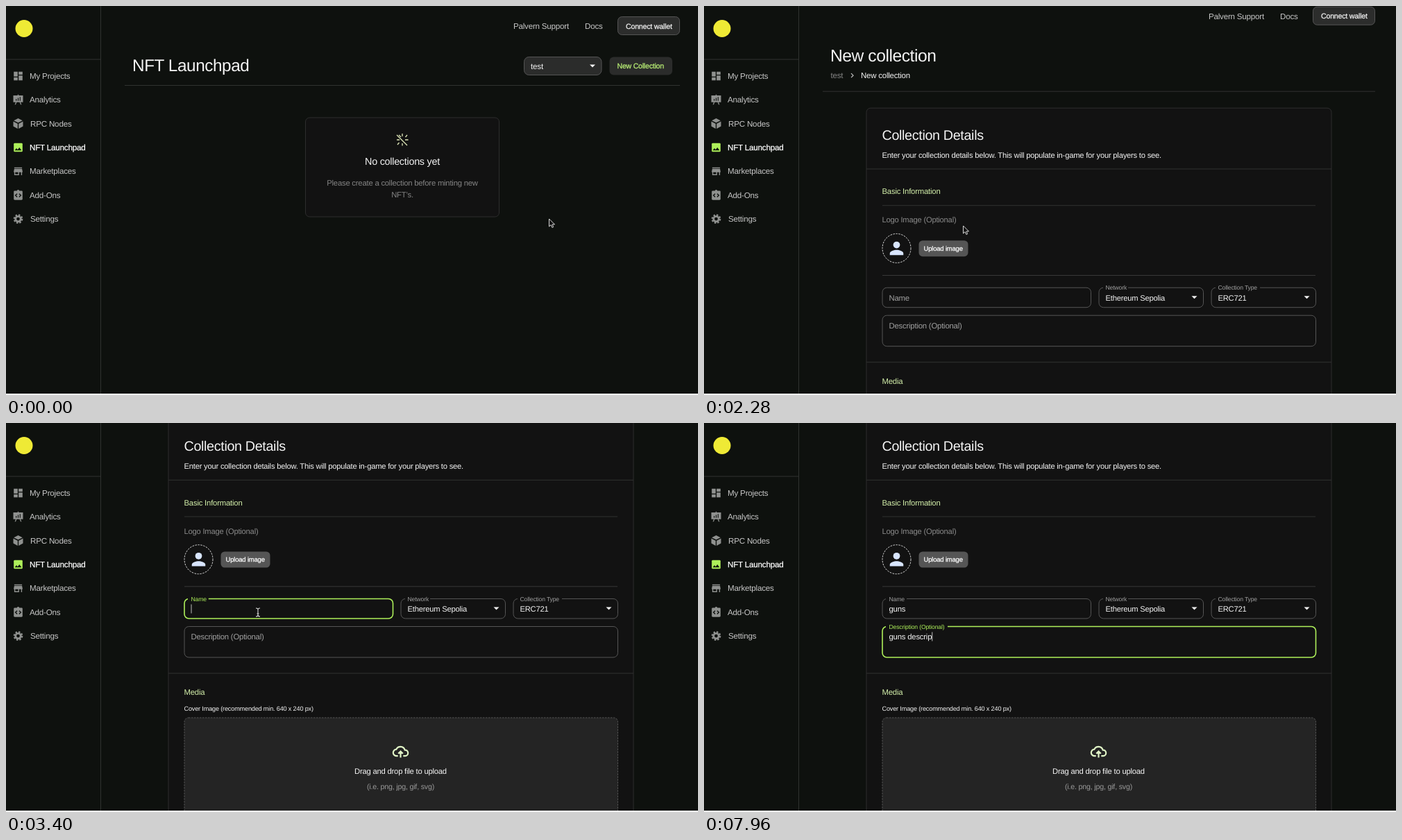
An HTML page that plays this animation: 997 by 561 pixels, repeating every 8000 ms.

```html
<!DOCTYPE html>
<html lang="en">
<head>
<meta charset="utf-8">
<title>Launchpad demo</title>
<style>
html, body { margin: 0; width: 100%; height: 100%; overflow: hidden; background: #fff }
svg { display: block; font-family: "Liberation Sans", Arial, sans-serif }
text { fill: currentColor; white-space: pre; letter-spacing: -.018em; text-rendering: geometricPrecision }
.medium { stroke: currentColor; stroke-width: .25 }
.center { text-anchor: middle }
</style>
</head>
<body>
<svg id="stage" width="997" height="561" viewBox="0 0 997 561"></svg>
<script>
const BG = '#0e110e', CARD = '#121212', LINE = '#303230', BORDER = '#555';
const WHITE = '#f4f4f4', GRAY = '#a0a0a0', SOFT = '#c6c6c6', LIME = '#aef05a', PALE = '#d3efaa';
const LOOP = 8000, STEP = 40;
const TIGHT = 1.04; // slightly larger glyphs make up for the tight letter spacing

// Drawing helpers
const text = (x, y, size, str, color = WHITE, cls = '') =>
  `<text x="${x}" y="${y}" font-size="${size * TIGHT}" color="${color}" class="${cls}">${str}</text>`;
const box = (x, y, w, h, r, fill, stroke = 'none', extra = '') =>
  `<rect x="${x}" y="${y}" width="${w}" height="${h}" rx="${r}" fill="${fill}" stroke="${stroke}" ${extra}/>`;
const path = (d, extra = '') => `<path d="${d}" ${extra}/>`;
const line = (x1, x2, y, color = LINE) => path(`M${x1} ${y}H${x2}`, `stroke="${color}"`);
const group = (id, body, extra = '') => `<g id="${id}" ${extra}>${body}</g>`;
const icon = (cx, cy, scale, body, color) =>
  `<g transform="translate(${cx} ${cy}) scale(${scale}) translate(-12 -12)" fill="${color}">${body}</g>`;
const arrowDown = (x, y) => path(`M${x - 4} ${y - 2}h8l-4 4z`, `fill="${WHITE}"`);

const icons = {
  'My Projects': path('M3 13h8V3H3zM3 21h8v-6H3zM13 21h8V11h-8zM13 3v6h8V3z'),
  'Analytics': path('M11 1h2v2h9v14h-5l2 5h-2l-2-5H9l-2 5H5l2-5H2V3h9z') +
    path('M8 14v-4M12 14V8M16 14V6', `stroke="${BG}" stroke-width="1.6"`),
  'RPC Nodes': path('M12 1l9 4.5-9 4.5-9-4.5zM2 7.5l9 4.5v10.500l-9-5zM22 7.500l-9 4.500v10.500l9-5z'),
  'NFT Launchpad': box(3, 3, 18, 18, 2, LIME) + path('M5 18l3.500-4.500 2.500 3 3.500-4.500 4.500 6z', `fill="${BG}"`),
  'Marketplaces': path('M4 4h16v2H4zM4 7h16l1 5v2h-1v6h-2v-6h-4v6H4v-6H3v-2zM6 14v4h6v-4z', 'fill-rule="evenodd"'),
  'Add-Ons': box(3, 3, 18, 19, 2, '#8f918f') + '<circle cx="12" cy="3.500" r="2.500"/>' +
    path('M10 9l-3.500 3.500 3.500 3.500M14 9l3.500 3.500-3.500 3.500', `fill="none" stroke="${BG}" stroke-width="2"`),
  'Settings': '<g fill="none" stroke="#8f918f"><circle cx="12" cy="12" r="5.400" stroke-width="4"/>' +
    '<circle cx="12" cy="12" r="8.200" stroke-width="3.200" pathLength="16" stroke-dasharray="1.100 .9"/></g>'
};

const sidebar = () =>
  path('M136.500 0V559', `stroke="${LINE}"`) + line(0, 136, 77) +
  '<circle cx="26" cy="32.500" r="12.500" fill="#efea35"/>' +
  Object.entries(icons).map(([name, art], i) => {
    const y = 101 + i * 34.350, active = name === 'NFT Launchpad';
    return icon(17.5, y, .7, art, '#8f918f') +
      text(name[0] === 'R' || name[0] === 'S' ? 35 : 34, y + 4, 11.2, name, active ? '#fff' : SOFT, active ? 'medium' : '');
  }).join('');

const topBar = right =>
  text(right - 240, 33, 11.15, 'Palvern Support', SOFT) + text(right - 137, 33, 11.15, 'Docs', SOFT) +
  box(right - 89.5, 15.5, 89, 26, 6, '#2c2d2c', BORDER) +
  text(right - 78, 32.5, 10.2, 'Connect wallet', WHITE, 'medium');

const listPage = () =>
  topBar(971) + text(182, 94, 23.4, 'NFT Launchpad') +
  box(746.5, 73.5, 111.5, 26, 7, '#2b2c2b', BORDER) + text(756, 90.5, 11.2, 'test') + arrowDown(845, 86.5) +
  box(869.5, 73.5, 90.5, 26, 6, '#2b2c2b') + text(880.5, 90.3, 10.1, 'New Collection', '#bdf477', 'medium') +
  line(171, 971, 114.5) +
  box(431.5, 161, 279, 143, 6, CARD, '#2d2d2d') +
  path('M563 186l15 15M571 184v4M575.500 189l2.500-3M575 193h4.500M571 198v3.500M566.500 197l-2.500 3M563 193h4M566 186l3 3',
    'stroke="#dfe8b8" stroke-width="1.300"') +
  text(571, 229, 13.8, 'No collections yet', WHITE, 'center') +
  text(571, 259.3, 10.85, 'Please create a collection before minting new', '#858585', 'center') +
  text(571, 276, 10.85, 'NFT’s.', '#858585', 'center');

// Outlined input with a label that floats onto its border
const field = (id, x, y, w, h, label) =>
  group(id,
    box(x, y, w, h, 6.5, 'none', BORDER, 'class="frame"') +
    box(x + 5, y - 2, 0, 4, 0, CARD, 'none', 'class="gap"') +
    text(0, 0, 10.9, label, GRAY, 'label') + text(x + 9.5, y + 18.5, 10.9, '', WHITE, 'value') +
    box(x + 9.5, y + 8, 1, 13, 0, '#bbb', 'none', 'class="caret"'));

const select = (x, label, gap, value) =>
  box(x, 253.5, 150.5, 28.5, 6.5, 'none', BORDER) + box(x + 6, 251, gap, 5, 0, CARD) +
  text(x + 9.5, 256.5, 8.3, label, GRAY) + text(x + 9.5, 272, 10.75, value) + arrowDown(x + 137.5, 267.5);

const FIELDS = {
  name: { x: 257, y: 253.5, w: 300.5, h: 28.5, gap: 30, focus: 3240, blur: 5160,
    value: 'guns', keys: [3720, 3840, 4040, 4160] },
  about: { x: 257, y: 293.5, w: 624.5, h: 44.5, gap: 89, focus: 5160, blur: Infinity,
    value: 'guns descrip', keys: [5560, 5760, 5960, 6120, 6320, 6600, 6840, 7120, 7320, 7560, 7760, 7960] }
};
const addField = (id, label) => {
  const { x, y, w, h } = FIELDS[id];
  return field(id, x, y, w, h, label);
};

// The form is laid out as it stands after scrolling
const formPage = () =>
  `<g transform="translate(0 -167)">` + topBar(967) + text(182, 94, 23.7, 'New collection') +
  text(182.5, 118.5, 11.1, 'test', '#858585') +
  path('M212 111.500l3 3-3 3', `fill="none" stroke="${SOFT}" stroke-width="1.200"`) +
  text(226, 118.5, 11, 'New collection') + line(171, 967, 137.5) + '</g>' +
  box(234, -5.5, 670, 900, 6, CARD, '#2d2d2d') +
  text(256.5, 40.3, 19, 'Collection Details') +
  text(256.5, 66.3, 10.75, 'Enter your collection details below. This will populate in-game for your players to see.') +
  line(234, 904, 82.3) + text(256.5, 118.8, 10.9, 'Basic Information', PALE) + line(257, 881, 135) +
  text(256.5, 159.5, 10.75, 'Logo Image (Optional)', '#8a8a8a') +
  `<ellipse cx="277.500" cy="196.700" rx="20.500" ry="21" fill="none" stroke="#ddd" stroke-dasharray="2.500 1.500"/>` +
  icon(277.5, 196.7, 1.22, '<circle cx="12" cy="8" r="4"/>' +
    path('M12 14c-2.700 0-8 1.300-8 4v2h16v-2c0-2.700-5.300-4-8-4z'), '#d8e5ff') +
  box(309.5, 185.5, 71, 23, 5.5, '#555') + text(316.5, 200.2, 9.1, 'Upload image', '#fff', 'medium') +
  line(257, 881, 235.8, '#383838') +
  addField('name', 'Name') + select(569, 'Network', 36, 'Ethereum Sepolia') +
  select(731, 'Collection Type', 64, 'ERC721') + addField('about', 'Description (Optional)') +
  line(234, 904, 361) + text(256.5, 392, 10.9, 'Media', PALE) +
  text(256.5, 415.3, 8.76, 'Cover Image (recommended min. 640 x 240 px)') +
  box(257, 425, 624.5, 180, 6, '#242424', '#555', 'stroke-dasharray="2.500 1.500"') +
  icon(568.5, 473.5, .95, path('M8 19H6A5 5 0 0 1 5.500 9 7 7 0 0 1 18.500 10a4.500 4.500 0 0 1 .5 9h-3M12 21.500v-9M8.500 15.500l3.500-3.500 3.500 3.500',
    `fill="none" stroke="#e0f4c6" stroke-width="2.300"`), 'none') +
  text(568.5, 505.5, 10.8, 'Drag and drop file to upload', WHITE, 'center') +
  text(568.5, 528.3, 10.25, '(i.e. png, jpg, gif, svg)', '#9a9a9a', 'center');

const pointers = {
  arrow: path('M0 0V11L2.600 8.700 4.400 12.500 6.200 11.700 4.500 8H8z', 'fill="#111" stroke="#eee" stroke-width=".9"'),
  hand: path('M0 1q1-1.500 2 0l.8 3.500 3.700.8q1.200.6.8 2l-.8 4.200H2.500L-1.500 7q0-1.500 2.200-.3z',
    'fill="#f4f4f4" stroke="#111" stroke-width=".7"'),
  beam: path('M-3-6q3 0 3 2q0-2 3-2M0-5V5M-3 6q3 0 3-2q0 2 3 2M-1.500 2h3', 'fill="none" stroke="#ddd" stroke-width="1.100"')
};

const stage = document.getElementById('stage');
stage.innerHTML = box(0, 0, 997, 559, 0, BG) + group('list', listPage()) + group('form', formPage()) + sidebar() +
  box(0, 559, 997, 2, 0, '#fff') +
  group('pointer', Object.entries(pointers).map(([id, art]) => group(id, art)).join(''));

// Timing
const OPEN = 1480;
const SCROLL = [[2200, 0], [2240, 4], [2280, 14.3], [2320, 58], [2360, 106], [2400, 144], [2440, 157], [2500, 164], [2600, 167]];
const MOVES = [[560, 782.5, 307], [840, 982, 118], [1000, 940, 79], [1480, 940, 79], [2120, 373.5, 317],
  [2680, 373.5, 317], [3080, 363, 273], [4320, 363, 273], [4720, 365.5, 322]];

const clamp = v => Math.min(1, Math.max(0, v));
const smooth = v => v * v * (3 - 2 * v);
const linear = v => v;

function track(keys, t, col, ease) {
  const i = keys.findIndex(k => k[0] > t);
  if (i === 0) return keys[0][col];
  if (i < 0) return keys[keys.length - 1][col];
  const a = keys[i - 1], b = keys[i];
  return a[col] + (b[col] - a[col]) * ease((t - a[0]) / (b[0] - a[0]));
}

const $ = sel => stage.querySelector(sel);
const set = (el, attrs) => Object.entries(attrs).forEach(([k, v]) => el.setAttribute(k, v));
const show = (el, on) => set(el, { visibility: on ? 'visible' : 'hidden' });
const inside = (f, x, y) => x > f.x && x < f.x + f.w && y > f.y && y < f.y + f.h;

function updateField(id, t, hover) {
  const f = FIELDS[id], part = cls => $(`#${id} .${cls}`);
  const focused = t >= f.focus && t < f.blur;
  const p = 1 - (1 - clamp((t - f.focus) / 200)) ** 3;
  const typed = f.keys.filter(k => k <= t);
  const lastKey = typed.length ? typed[typed.length - 1] : f.focus;
  set(part('frame'), { stroke: focused ? LIME : hover ? '#fff' : BORDER, 'stroke-width': focused ? 1.6 : 1 });
  set(part('gap'), { width: f.gap * p });
  set(part('label'), { x: f.x + 9.5, y: f.y + 18.5 - 15.5 * p, 'font-size': (10.9 - 2.6 * p) * TIGHT,
    color: focused ? LIME : GRAY });
  const value = part('value');
  value.textContent = f.value.slice(0, typed.length);
  set(part('caret'), { x: f.x + 9.5 + value.getComputedTextLength() });
  show(part('caret'), focused && (t - lastKey) % 1000 < 500);
}

function render(t) {
  const onForm = t >= OPEN, scroll = track(SCROLL, t, 1, linear);
  const x = track(MOVES, t, 1, smooth), y = track(MOVES, t, 2, smooth);
  $('#list').style.display = onForm ? 'none' : '';
  $('#form').style.display = onForm ? '' : 'none';
  set($('#form'), { transform: `translate(0 ${167 - scroll})` });

  let kind = 'arrow';
  if (!onForm && x > 870 && x < 960 && y > 73 && y < 100) kind = 'hand';
  if (onForm) for (const id in FIELDS) {
    const hover = t >= 2600 && inside(FIELDS[id], x, y);
    if (hover) kind = 'beam';
    updateField(id, t, hover && t < 5560);
  }
  set($('#pointer'), { transform: `translate(${x} ${y})` });
  const typing = (t >= 3720 && t < 4320) || t >= 5560;
  for (const id in pointers) show($('#' + id), id === kind && !typing);
}

const start = performance.now();
(function frame() {
  const t = (performance.now() - start) % LOOP;
  render(Math.floor(t / STEP) * STEP);
  requestAnimationFrame(frame);
})();
</script>
</body>
</html>
```
